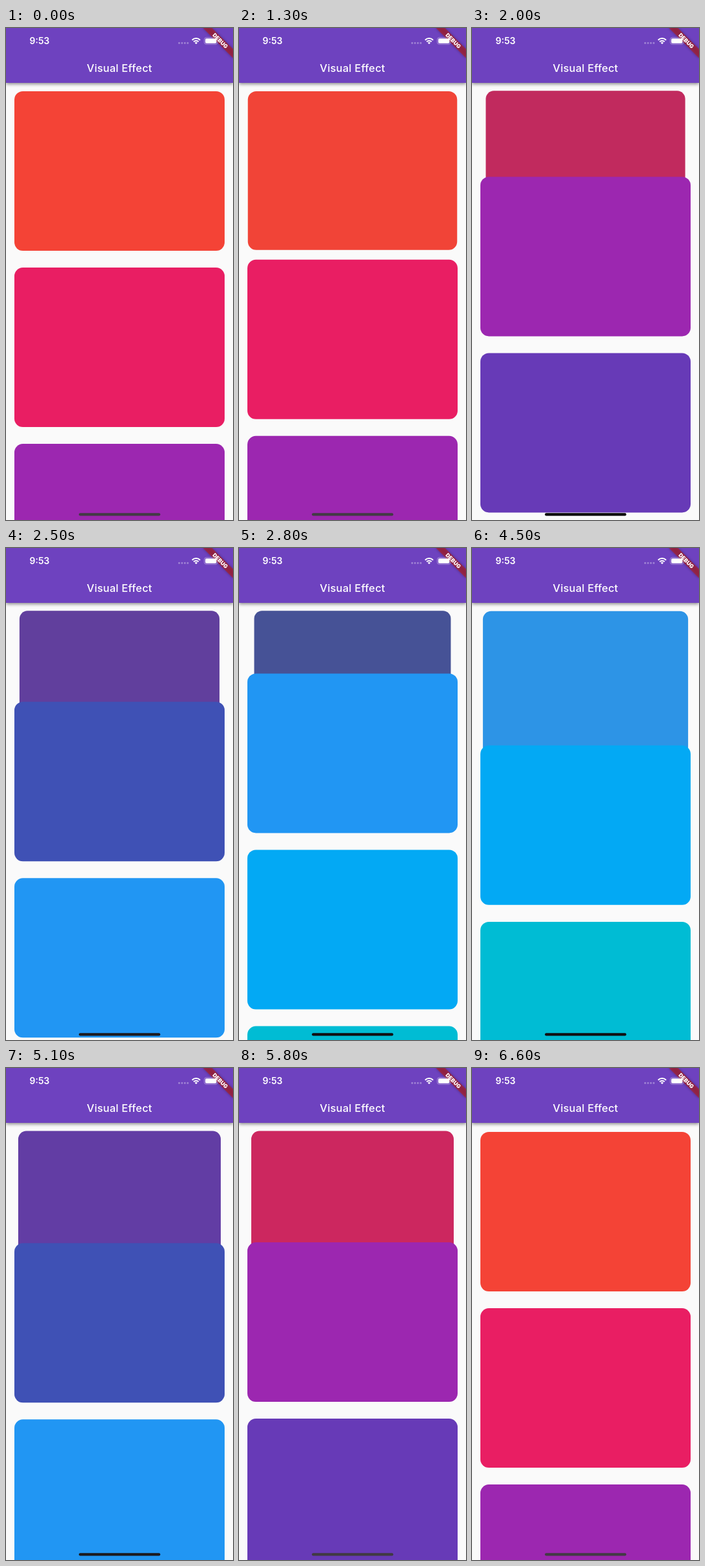
These frames come from a looping animation (352x762 px, 6700 ms). An HTML page:

```html
<!DOCTYPE html>
<html lang="en">
<head>
<meta charset="utf-8">
<title>Visual Effect</title>
<style>
  html, body { margin: 0; width: 100%; height: 100%; overflow: hidden; background: #fafafa; }
  #stage { position: absolute; left: 0; top: 0; width: 352px; height: 762px; overflow: hidden; }
  .card {
    position: absolute; left: 13.16px; top: 97.87px; width: 325.68px; height: 246.73px;
    border-radius: 13.16px; transform-origin: 50% -13.16px;
  }
  #bar {
    position: absolute; left: 0; top: 0; width: 352px; height: 84.7px; background: #6e42bf;
    box-shadow: 0 2px 5px rgba(0,0,0,.45);
  }
  svg { position: absolute; left: 0; top: 0; }
  text { font-family: Inter, Roboto, sans-serif; fill: #fff; text-anchor: middle; }
  #ribbon { filter: drop-shadow(0 0 2.5px rgba(0,0,0,.5)); }
  #dots { fill: none; stroke: #fff; stroke-opacity: .35; stroke-width: 3; stroke-linecap: round; stroke-dasharray: 0 4.43; }
</style>
</head>
<body>
<div id="stage">
  <div id="list"></div>
  <div id="bar"></div>
  <svg width="352" height="762" viewBox="0 0 352 762">
    <text x="176" y="67.5" font-size="16.4" font-weight="500" letter-spacing=".25">Visual Effect</text>
    <text x="52" y="25" font-size="14" font-weight="600">9:53</text>
    <path id="dots" d="M268.5 23.3h13.4"/>
    <path d="M288.6 18.7a8.6 8.6 0 0 1 12.4 0M291 21.3a5.3 5.3 0 0 1 7.6 0" fill="none" stroke="#fff" stroke-width="2"/>
    <path d="M292.7 22.9a3 3 0 0 1 4.2 0l-2.1 2.2z" fill="#fff"/>
    <g transform="translate(352 0) rotate(45) scale(.8224)">
      <rect id="ribbon" x="-40" y="28" width="80" height="12" fill="#b71c1c" fill-opacity=".63"/>
      <text y="37.6" font-size="10.2" font-weight="900">DEBUG</text>
    </g>
    <rect x="307.5" y="14.8" width="20.5" height="10.4" rx="3" fill="none" stroke="#fff" stroke-opacity=".4"/>
    <rect x="309" y="16.2" width="17.4" height="7.6" rx="1.8" fill="#fff"/>
    <rect id="home" x="113" y="751.3" width="126.3" height="4.2" rx="2.1"/>
  </svg>
</div>
<script>
  const LOOP = 6700, STEP = 100, PITCH = 273.05, TOP = 97.87, HEIGHT = 246.73;
  const HOME_Y = 753, END = 1755, BOUNCE = 1;
  const palette = '#f44336 #e91e63 #9c27b0 #673ab7 #3f51b5 #2196f3 #03a9f4 #00bcd4 #009688'.split(' ');

  const clamp = (v, lo, hi) => Math.min(hi, Math.max(lo, v));
  const home = document.getElementById('home');

  function luma(hex) {
    const n = parseInt(hex.slice(1), 16);
    return .2126 * (n >> 16) + .7152 * (n >> 8 & 255) + .0722 * (n & 255);
  }

  const cards = palette.map(color => {
    const card = document.createElement('div');
    card.className = 'card';
    card.style.background = color;
    return document.getElementById('list').appendChild(card);
  });

  // S-curve from 0 to 1; a shapes the start, b the end
  function sweep(t, from, to, a, b) {
    const u = clamp((t - from) / (to - from), 0, 1);
    const p = u ** a, q = (1 - u) ** b;
    return p / (p + q);
  }

  const scrollAt = t =>
    END * sweep(t, 1200, 4000, 1.511, 2.13) - (END + BOUNCE) * sweep(t, 4200, 6600, .809, 1.485);

  function draw(t) {
    const scroll = scrollAt(t);
    let under = '#fafafa';
    cards.forEach((card, i) => {
      const y = i * PITCH - scroll;
      const passed = clamp(-y / PITCH, 0, 1);
      card.style.visibility = passed < 1 ? 'visible' : 'hidden';
      card.style.transform = `translateY(${Math.max(0, y)}px) scale(${1 - passed * .1})`;
      card.style.filter = `saturate(${1 - passed * .5})`;
      if (TOP + y < HOME_Y && TOP + y + HEIGHT > HOME_Y) under = palette[i];
    });
    // The home indicator darkens over bright content
    const v = clamp(66 - (luma(under) - 74) * .65, 0, 66);
    home.setAttribute('fill', `rgb(${v},${v * .9},${v * 1.03})`);
  }

  const start = performance.now();
  function frame() {
    const t = (performance.now() - start) % LOOP;
    draw(Math.floor(t / STEP) * STEP);
    requestAnimationFrame(frame);
  }
  frame();
</script>
</body>
</html>
```
